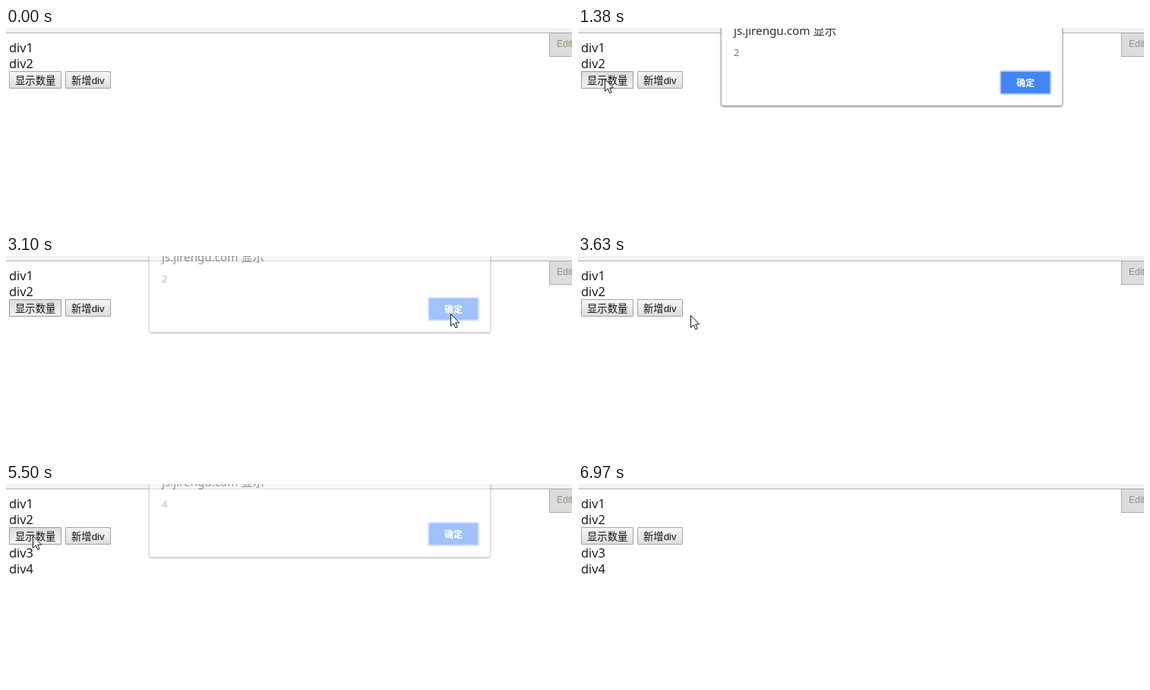
An HTML page for the animation above (7440 ms loop, 745 by 264 pixels).

```html
<!DOCTYPE html>
<html lang="zh">
<head>
<meta charset="utf-8">
<title>div counter</title>
<style>
html, body { margin: 0; width: 100%; height: 100%; overflow: hidden; background: #fff; }
svg { display: block; width: 745px; height: 264px; }
.page { font: 16.5px "Open Sans", "Noto Sans", sans-serif; fill: #111; }
.btn { font: 13.33px "Liberation Sans", "Noto Sans CJK SC", "Noto Sans CJK", sans-serif; fill: #111; }
.face { fill: url(#up); stroke: #a3a3a3; }
.hover { fill: none; stroke: #707070; }
.press { fill: url(#down); stroke: #999; }
.tab { font: 12px "Liberation Sans", Arial, sans-serif; fill: #998c7c; }
.title { font: 15.2px "Noto Sans", "Noto Sans CJK SC", "Noto Sans CJK", sans-serif; fill: #2b2b2b; }
.count { font: 13px "Noto Sans", sans-serif; fill: #7b7b7b; }
.ok { font: bold 12px "Noto Sans CJK SC", "Noto Sans CJK", sans-serif; fill: #fff; }

.hover, .press, .added, .count, .alert, .cursor { animation: 7.44s step-end infinite; }
.show .hover { animation-name: showHover; }
.show .press { animation-name: showPress; }
.add .hover { animation-name: addHover; }
.add .press { animation-name: addPress; }
.added { animation-name: added; }
.two { animation-name: two; }
.four { animation-name: four; }
.alert { animation-name: alert; }
.cursor { animation-name: cursor; }

@keyframes showHover {
  0%, 17.204%, 54.973%, 72.983%, 100% { opacity: 0; }
  13.037%, 51.908%, 66.532% { opacity: 1; }
}
@keyframes showPress {
  0%, 42.607%, 88.306%, 100% { opacity: 0; }
  14.112%, 69.623% { opacity: 1; }
}
@keyframes addHover {
  0%, 51.908%, 66.532%, 100% { opacity: 0; }
  49.825%, 54.973% { opacity: 1; }
}
@keyframes addPress {
  0%, 63.172%, 100% { opacity: 0; }
  62.096% { opacity: 1; }
}
@keyframes added {
  0%, 100% { opacity: 0; }
  63.172% { opacity: 1; }
}
@keyframes two {
  0%, 100% { opacity: 1; }
  60% { opacity: 0; }
}
@keyframes four {
  0%, 100% { opacity: 0; }
  60% { opacity: 1; }
}
@keyframes alert {
  0%, 42.607%, 88.306%, 100% { opacity: 0; transform: translateY(-12px); }
  17.204%, 72.983% { opacity: .5; transform: translateY(-8px); }
  18.548%, 74.059% { opacity: 1; transform: translateY(-2px); }
  19.623%, 75.134% { opacity: 1; transform: none; }
  41.532%, 87.365% { opacity: .5; transform: translateY(-4px); }
}
@keyframes cursor {
  0%, 93.682%, 100% { transform: translate(712px, 400px); }
  3.897% { transform: translate(497px, 247px); animation-timing-function: steps(4); }
  7.930% { transform: translate(143px, 168px); animation-timing-function: steps(4); }
  11.962% { transform: translate(45px, 92px); }
  13.037%, 20.698% { transform: translate(35px, 67px); }
  20.698% { animation-timing-function: steps(4); }
  24.731%, 25.806% { transform: translate(81px, 72px); }
  25.806% { animation-timing-function: steps(6); }
  32.392% { transform: translate(163px, 82px); animation-timing-function: steps(4); }
  36.559% { transform: translate(565px, 92px); animation-timing-function: steps(3); }
  39.516%, 42.607% { transform: translate(585px, 76px); }
  42.607% { animation-timing-function: steps(4); }
  46.639% { transform: translate(190px, 82px); animation-timing-function: steps(2); }
  48.790% { transform: translate(148px, 78px); animation-timing-function: steps(4); }
  52.956% { transform: translate(45px, 68px); animation-timing-function: steps(4); }
  56.989% { transform: translate(113px, 67px); }
  58.064% { transform: translate(114px, 68px); }
  58.736% { transform: translate(115px, 68px); }
  65.456% { transform: translate(99px, 69px); }
  66.532% { transform: translate(68px, 69px); }
  67.607%, 76.075% { transform: translate(35px, 68px); }
  76.075% { animation-timing-function: steps(3); }
  79.032% { transform: translate(421px, 125px); animation-timing-function: steps(3); }
  81.989% { transform: translate(560px, 100px); animation-timing-function: steps(3); }
  85.349%, 88.306% { transform: translate(581px, 78px); }
  89.381% { transform: translate(603px, 96px); animation-timing-function: steps(3); }
  92.741% { transform: translate(712px, 262px); }
}
</style>
</head>
<body>
<svg viewBox="0 0 745 264">
  <defs>
    <linearGradient id="up" x2="0" y2="1">
      <stop offset="0" stop-color="#f6f6f6"/>
      <stop offset="1" stop-color="#dedede"/>
    </linearGradient>
    <linearGradient id="down" x2="0" y2="1">
      <stop offset="0" stop-color="#dcdcdc"/>
      <stop offset="1" stop-color="#f4f4f4"/>
    </linearGradient>
    <filter id="shadow" x="-5%" y="-10%" width="110%" height="125%">
      <feDropShadow dx="0" dy="1" stdDeviation="1.3" flood-opacity=".5"/>
    </filter>
  </defs>

  <rect width="745" height="6" fill="#f2f2f2"/>
  <rect y="6" width="745" height="1" fill="#b3b3b3"/>
  <rect x="715.5" y="6.5" width="40" height="31" fill="#ddd" stroke="#aaa"/>
  <text class="tab" x="725" y="25">Edit</text>

  <g class="page">
    <text x="4" y="32">div1</text>
    <text x="4" y="53">div2</text>
    <g class="added">
      <text x="4" y="97">div3</text>
      <text x="4" y="118">div4</text>
    </g>
  </g>

  <g class="btn show">
    <rect class="face" x="4.5" y="57.5" width="68" height="22" rx=".5"/>
    <rect class="press" x="4.5" y="57.5" width="68" height="22" rx=".5"/>
    <rect class="hover" x="4.5" y="57.5" width="68" height="22" rx=".5"/>
    <text x="12" y="74">显示数量</text>
  </g>
  <g class="btn add">
    <rect class="face" x="78.5" y="57.5" width="59" height="22" rx=".5"/>
    <rect class="press" x="78.5" y="57.5" width="59" height="22" rx=".5"/>
    <rect class="hover" x="78.5" y="57.5" width="59" height="22" rx=".5"/>
    <text x="86" y="74">新增div</text>
  </g>

  <g class="alert">
    <rect x="188.5" y="-40" width="449" height="144.5" rx="2.5" fill="#fff" stroke="#b5b5b5" filter="url(#shadow)"/>
    <text class="title" x="205" y="11">js.jirengu.com 显示</text>
    <text class="count two" x="205" y="39">2</text>
    <text class="count four" x="205" y="39">4</text>
    <rect x="556" y="59" width="66" height="30" rx="2" fill="#4285f4" stroke="#a6c6fa" stroke-width="2"/>
    <text class="ok" x="577" y="79">确定</text>
  </g>

  <g class="cursor">
    <path d="M.5 .5V16.5L4.2 13L6.8 18.8L9.2 17.8L6.7 12.1H11.6Z" fill="#fff" stroke="#111"/>
  </g>
</svg>
</body>
</html>
```
